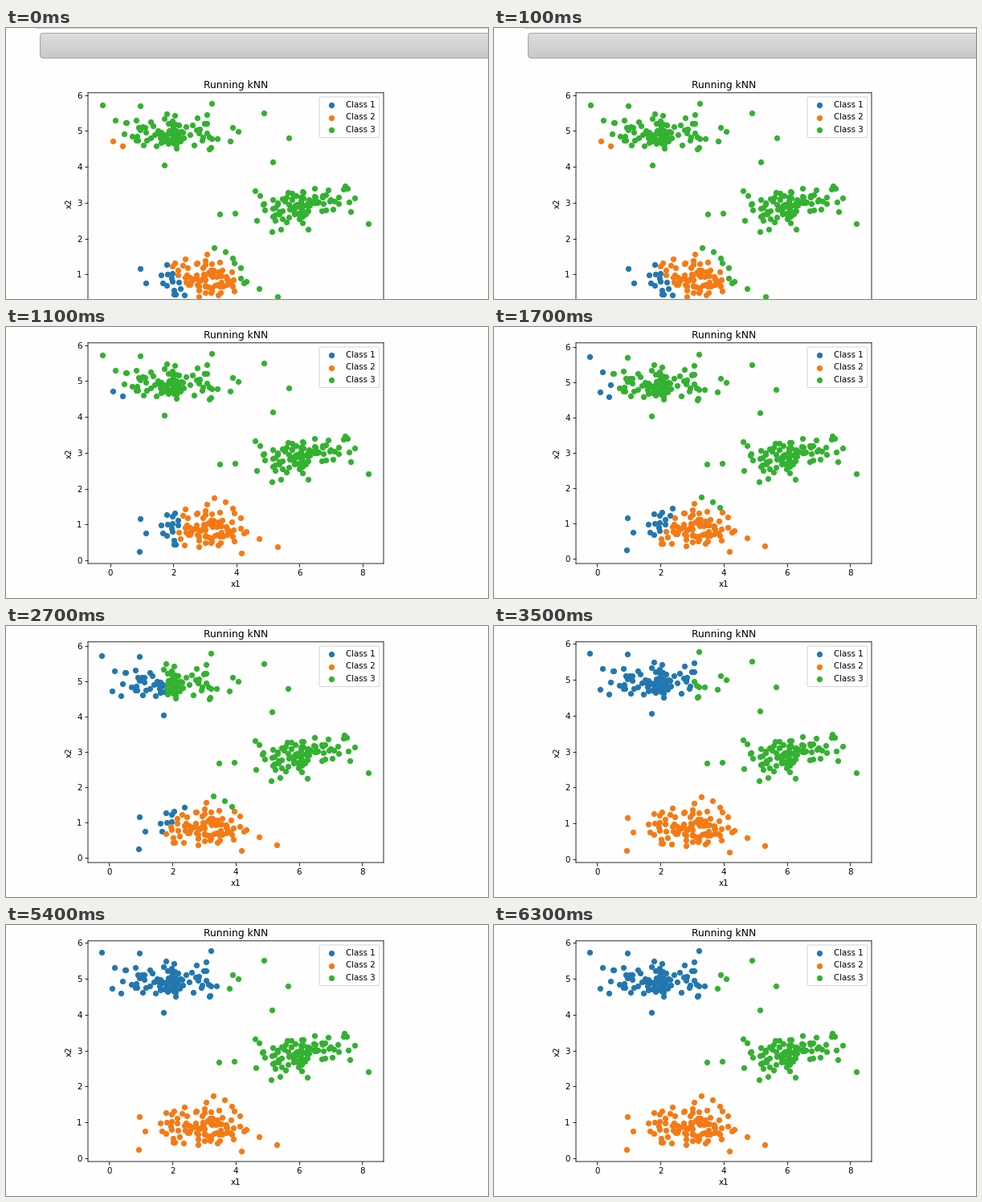
A matplotlib script that plays this animation: 600x338 px, repeating every 6400 ms.

```python
import numpy as np
import matplotlib.pyplot as plt
from matplotlib.animation import FuncAnimation
from matplotlib.patches import FancyBboxPatch

W, H, DPI = 600, 338, 100
FRAMES, STEP_MS = 64, 100

# Default chart styling, scaled down to the size of the chart on the page.
K = 0.742
plt.rcParams["font.family"] = "DejaVu Sans"
plt.rcParams["font.size"] = 10 * K
plt.rcParams["path.snap"] = False
for key in ("axes.linewidth", "lines.linewidth", "patch.linewidth",
            "axes.labelpad", "axes.titlepad",
            "xtick.major.size", "xtick.major.width", "xtick.major.pad",
            "ytick.major.size", "ytick.major.width", "ytick.major.pad"):
    plt.rcParams[key] *= K

COLORS = ("#2277b0", "#f57a14", "#33b130")
PAPER = "#fefefe"
rng = np.random.default_rng(7)


def cloud(n, mean, spread, low, high, tilt=0.0):
    """Normal points kept inside a box."""
    pts = []
    while len(pts) < n:
        u, v = rng.normal(size=2)
        p = np.array(mean) + np.array(spread) * (u, v + tilt * u)
        if np.all(p > low) and np.all(p < high):
            pts.append(p)
    return np.array(pts)


# Lone points that stand clear of the clouds.
LONERS = [
    (-.24, 5.72), (.17, 5.3), (.1, 4.73), (.96, 5.7), (1.72, 4.05),
    (3.21, 5.78), (3.8, 4.73), (3.89, 5.1), (4.07, 4.99), (4.88, 5.5),
    (5.65, 4.8), (5.15, 4.13),
    (3.47, 2.68), (3.96, 2.71), (4.6, 3.33), (5.12, 2.19), (5.4, 2.27),
    (6.27, 2.25), (7.43, 3.47), (7.76, 3.14), (8.19, 2.41),
    (.94, .25), (.96, 1.17), (1.13, .76), (2.02, .44), (2.38, 1.43),
    (3.06, 1.57), (3.29, 1.75), (3.65, 1.63), (3.88, 1.46), (4.17, .21),
    (4.73, .61), (5.3, .38),
]
POINTS = np.vstack([
    LONERS,
    cloud(90, (2.0, 5.0), (.85, .32), (.3, 4.4), (3.45, 5.62)),
    cloud(90, (6.1, 2.95), (.75, .23), (4.15, 2.4), (7.7, 3.42), .25),
    cloud(88, (3.05, 1.0), (.8, .3), (1.4, .25), (4.5, 1.4)),
])

# Axis limits: x, then y.
START = (-.70, 8.664), (-.0895, 6.067)
MIDDLE = (-.668, 8.673), (-.125, 6.11)
END = (-.668, 8.673), (-.085, 6.046)

# Class centres and view of each step of the clustering.
FIRST_MS, STAGE_MS = 200, 700
STAGES = [
    ([(1.838, .203), (2.9, 1.0), (3.975, 2.075)], START),
    ([(.92, -.09), (3.2, 1.05), (4.1, 4.1)], START),
    ([(1.25, 1.05), (3.1, .95), (4.1, 4.0)], START),
    ([(1.328, 1.23), (2.95, .5), (3.49, 2.66)], MIDDLE),
    ([(1.518, 1.963), (3.0, .6), (3.487, 2.548)], MIDDLE),
    ([(1.15, 4.3), (3.15, .9), (4.75, 3.85)], END),
    ([(1.9, 5.0), (3.1, 0), (5.3, 4.3)], END),
]
SCROLL_BY = 61

fig = plt.figure(figsize=(W / DPI, H / DPI), dpi=DPI, facecolor=PAPER)

# Notebook page behind the chart, in pixels.
page = fig.add_axes([0, 0, 1, 1], zorder=-1)
page.axis("off")
bar = FancyBboxPatch((46.5, 10.5), 580, 23, fc="none", ec="#a6a6a6", lw=.75,
                     boxstyle="round,pad=4,rounding_size=4", zorder=3)
shade = page.imshow(np.linspace(0.87, 0.78, 32)[:, None], cmap="gray", vmin=0,
                    vmax=1, extent=(42, 631, 38, 6), aspect="auto")
page.add_patch(bar)
shade.set_clip_path(bar)
page.plot([37, W], [.5, .5], color="#cfcfcf", lw=.72)
page.set(xlim=(0, W), ylim=(H, 0))

ax = fig.add_axes([0, 0, 1, 1], facecolor=PAPER)
dots = [ax.scatter([], [], s=36 * K * K, color=c, label=f"Class {i}")
        for i, c in enumerate(COLORS, 1)]
ax.set_title("Running kNN")
ax.set_xlabel("x1")
ax.set_ylabel("x2")
ax.set_xticks(range(0, 9, 2))
ax.set_yticks(range(7))
ax.legend(loc="upper right", borderpad=.45, labelspacing=.55)


def place_chart(dy):
    ax.set_position([102 / W, 1 - (295 + dy) / H, 368 / W, 275.2 / H])


def draw(i):
    t = i * STEP_MS
    stage = (t - FIRST_MS) // STAGE_MS + 1
    stage = min(max(stage, 0), len(STAGES) - 1)
    centres, (xlim, ylim) = STAGES[stage]
    gaps = POINTS[:, None] - np.array(centres)
    label = (gaps ** 2).sum(axis=2).argmin(axis=1)
    for k, d in enumerate(dots):
        d.set_offsets(POINTS[label == k])
    ax.set(xlim=xlim, ylim=ylim)
    page.set_visible(stage == 0)
    place_chart(SCROLL_BY if stage == 0 else 0)
    return dots


anim = FuncAnimation(fig, draw, frames=FRAMES, interval=STEP_MS,
                     init_func=lambda: draw(0), repeat=True, repeat_delay=0)
plt.show()
```
